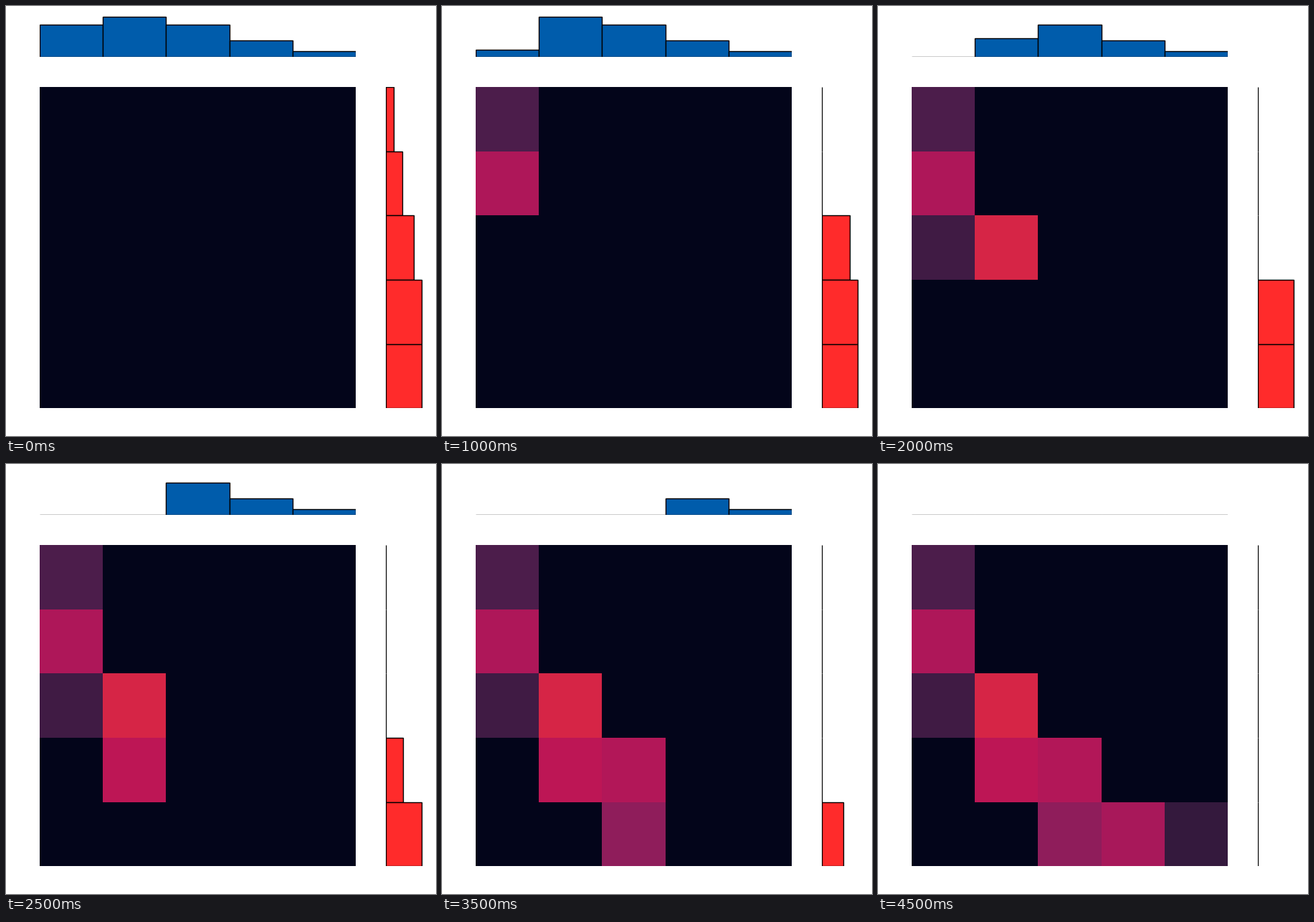
Recreate the animation shown at these times as a matplotlib script. Size 600 by 600 pixels, loop 5000 ms.

```python
import numpy as np
import matplotlib.pyplot as plt
from matplotlib.animation import FuncAnimation
from matplotlib.patches import Rectangle

SIZE, DPI, N = 600, 100, 5
DARK, BLUE, RED = "#03051a", "#005cab", "#ff2b2b"
RED_SCALE = 0.975

# Transport steps from the top left corner: row, column, mass, colour
STEPS = [
    (0, 0, 11.2, "#4c1d4b"),
    (1, 0, 23.6, "#ae1759"),
    (2, 0, 10.2, "#401b44"),
    (2, 1, 30.0, "#d62546"),
    (3, 1, 26.0, "#bd1655"),
    (3, 2, 24.8, "#b21758"),
    (4, 2, 20.2, "#8f1d5b"),
    (4, 3, 23.2, "#a8185a"),
    (4, 4, 7.4, "#34193d"),
]

fig = plt.figure(figsize=(SIZE / DPI, SIZE / DPI), dpi=DPI, facecolor="white")


def panel(left, top, right, bottom, xlim, ylim):
    """Add bare axes on a box given in pixels from the top left."""
    box = [left, SIZE - bottom, right - left, bottom - top]
    ax = fig.add_axes([v / SIZE for v in box])
    ax.set(xlim=xlim, ylim=ylim)
    ax.set_axis_off()
    return ax


top_ax = panel(47, 11.8, 488, 70.8, (0, N), (0, 59))
map_ax = panel(47, 113, 488, 561.2, (0, N), (N, 0))
side_ax = panel(530.2, 113, 585.2, 561.2, (0, 55), (N, 0))

style = dict(align="edge", edgecolor="black", linewidth=1)
col_bars = top_ax.bar(range(N), np.ones(N), 1, color=BLUE, **style)
row_bars = side_ax.barh(range(N), np.ones(N), 1, color=RED, **style)

cells = {}
for r in range(N):
    for c in range(N):
        cell = Rectangle((c, r), 1, 1, facecolor=DARK, linewidth=0, antialiased=False)
        cells[r, c] = map_ax.add_patch(cell)


def update(frame):
    """Show the plan after the given number of steps and the mass still left."""
    rows, cols = np.zeros(N), np.zeros(N)
    for i, (r, c, mass, color) in enumerate(STEPS):
        done = i < frame
        cells[r, c].set_facecolor(color if done else DARK)
        if not done:
            rows[r] += mass
            cols[c] += mass
    for bar, left in zip(col_bars, cols):
        bar.set_height(left)
    for bar, left in zip(row_bars, rows):
        bar.set_width(left * RED_SCALE)
    return [*col_bars, *row_bars, *cells.values()]


anim = FuncAnimation(fig, update, frames=len(STEPS) + 1, interval=500,
                     init_func=lambda: update(0), repeat=True, repeat_delay=0)
plt.show()
```
